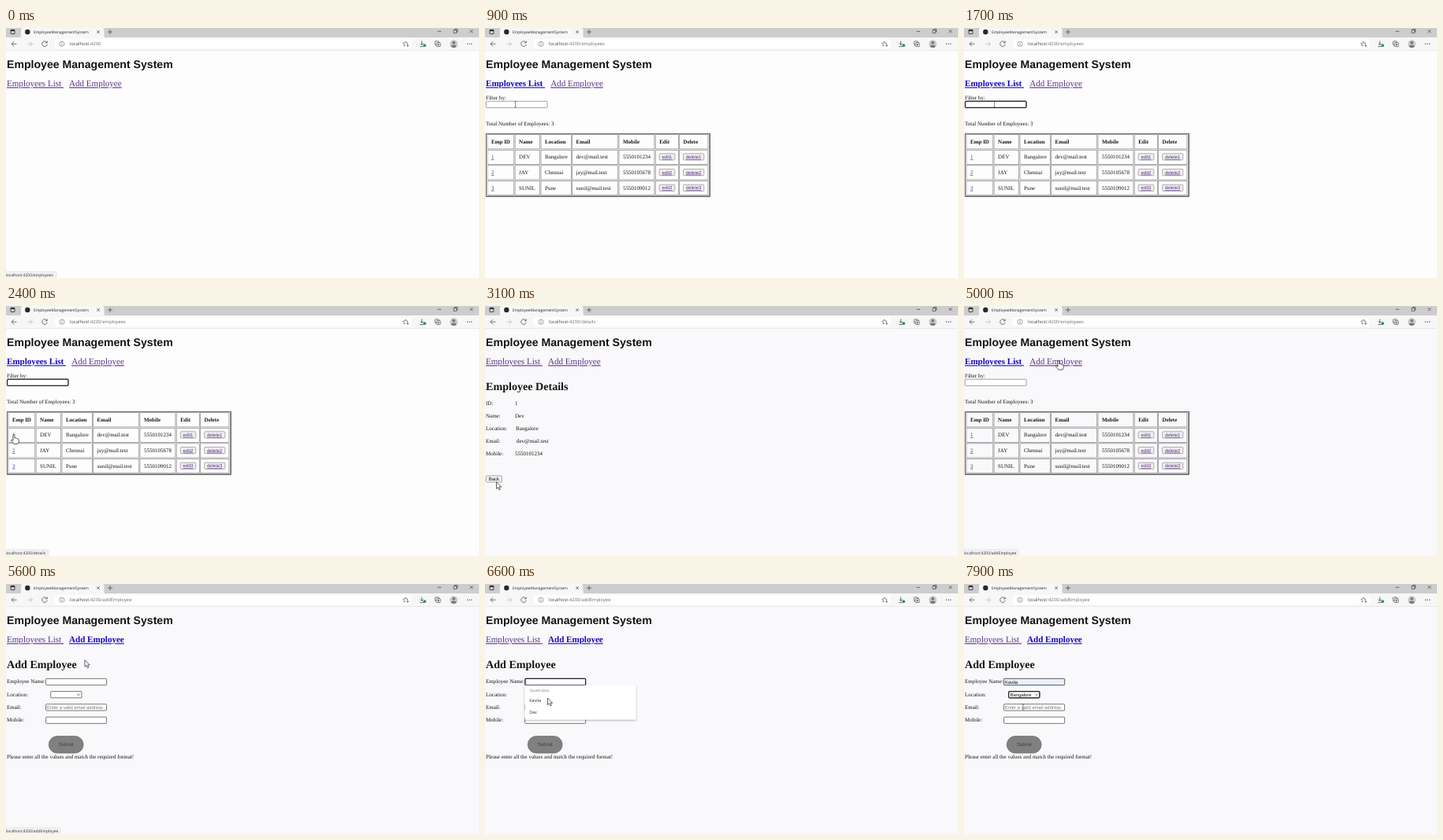
These frames come from a looping animation (600 px wide and 318 px high, 8000 ms). An HTML page:

```html
<!DOCTYPE html>
<html lang="en">
<head>
<meta charset="utf-8">
<title>Employee Management System</title>
<style>
html, body { margin: 0; width: 100%; height: 100%; overflow: hidden; background: #fdfdfd; }
svg { display: block; width: 100vw; height: 100vh; }
text { white-space: pre; text-rendering: geometricPrecision; }
.serif { font-family: "Liberation Serif", "Times New Roman", serif; }
.sans { font-family: "Liberation Sans", Arial, sans-serif; }
.ui { font-family: "Open Sans", "Noto Sans", sans-serif; }
.b { font-weight: 700; }
.u { text-decoration: underline; }
.line { fill: none; stroke: #444; stroke-width: .75; }
</style>
</head>
<body>
<svg id="stage" viewBox="0 0 600 318" preserveAspectRatio="none"></svg>
<script>
const LOOP = 8000, STEP = 100;
const PURPLE = '#5a2f8a', BLUE = '#1408c4', INK = '#141414';

const text = (x, y, s, size = 7, cls = 'serif', fill = INK) =>
  `<text x="${x}" y="${y}" font-size="${size}" class="${cls}" fill="${fill}">${s}</text>`;
const rect = (x, y, w, h, fill, stroke = 'none', sw = 0.7, rx = 0) =>
  `<rect x="${x}" y="${y}" width="${w}" height="${h}" rx="${rx}" fill="${fill}" stroke="${stroke}" stroke-width="${sw}"/>`;
const line = (d, extra = '') => `<path class="line" d="${d}" ${extra}/>`;
const group = (id, body) => `<g id="${id}">${body}</g>`;
const button = (x, y, w, label, cls = 'sans', fill = INK) =>
  rect(x, y, w, 8.2, '#efefef', '#8f8f8f', 0.7, 1) + text(x + 3.4, y + 6.2, label, 5.9, cls, fill);
const field = (x, y, w, fill = '#fff', stroke = '#555') => rect(x, y, w, 8.2, fill, stroke, 0.8, 0.8);
const ring = (x, y, w) => rect(x, y, w, 8.2, 'none', '#22222c', 1.2, 1.2);

// Browser frame
function chrome() {
  return rect(0, 0, 600, 12.5, '#cdcdcd') +
    rect(0, 12, 600, 16.3, '#f7f7f7') +
    rect(0, 28, 600, 0.7, '#e2e2e2') +
    '<path d="M17 12.5Q19 12 19 10V2.500Q19 0 21.500 0H122Q124.500 0 124.500 2.500V10Q124.500 12 126.500 12.500Z" fill="#f7f7f7"/>' +
    rect(6, 2.3, 5, 5.2, 'none', '#222', 0.8, 0.8) + rect(6, 2.2, 5, 1.7, '#222') +
    '<circle cx="27.300" cy="5" r="3.200" fill="#26282c"/>' +
    text(35, 6.9, 'EmployeeManagementSystem', 4.95, 'ui', '#222') +
    line('M115.300 3.200l3.600 3.600m0-3.600l-3.600 3.600') +
    line('M129 5h6M132 2v6') +
    line('M547.500 4.300h4.500M588.400 2.200l4 4m0-4l-4 4') +
    rect(568, 2.7, 3.6, 3.6, 'none', '#444', 0.7) + line('M569.200 2.700V1.600h3.500v3.500h-1.100') +
    line('M13.500 20.200H7m3-3l-3 3 3 3') +
    line('M27 20.200h6.500m-3-3l3 3-3 3', 'opacity=".35"') +
    line('M51.800 18.300A3.300 3.300 0 1 0 52.300 20.800M52.300 16.600v2.200h-2.300') +
    rect(62, 14.2, 452, 11.8, '#fff', 'none', 0, 2.5) +
    '<circle cx="71" cy="20.200" r="3.100" class="line" style="stroke:#666;stroke-width:.6"/>' +
    line('M71 19.600v2.300M71 18.100v.7', 'style="stroke:#666"') +
    line('M506.700 17l1 2 2.200.3-1.600 1.500M506.700 17l-1 2-2.200.3 1.700 1.500-.4 2.200 1.700-.9M508 22.300h3.200M509.600 20.700v3.200', 'stroke-linejoin="round" opacity=".8"') +
    line('M527.500 16.500v5m-2-2l2 2 2-2M525 23.600h4.500') +
    '<circle cx="531" cy="22.200" r="1.900" fill="#2f8f4e"/>' +
    rect(544.2, 16.8, 5, 5, 'none', '#444', 0.7, 1) + rect(546, 18.6, 5, 5, '#f7f7f7', '#444', 0.7, 1) +
    line('M547.200 21.100h2.600m-1.300-1.300v2.600') +
    '<circle cx="568" cy="20.200" r="5" fill="#cbc9ca"/><circle cx="568" cy="18.700" r="1.900" fill="#77797d"/>' +
    '<path d="M564.300 23.400a3.800 2.600 0 0 1 7.400 0Q568 27 564.300 23.400Z" fill="#77797d"/>' +
    [585.4, 588, 590.6].map(x => `<circle cx="${x}" cy="20.200" r=".65" fill="#333"/>`).join('');
}

function nav(active) {
  const link = (x, s, on) => text(x, 74.3, s, 11.07, on ? 'serif b u' : 'serif u', on ? BLUE : PURPLE);
  return link(1, 'Employees List\u00a0', active === 'list') +
    link(active === 'list' ? 83.2 : 80, 'Add Employee', active === 'add');
}

const staff = [
  ['DEV', 'Bangalore', 'dev@mail.test', '5550101234'],
  ['JAY', 'Chennai', 'jay@mail.test', '5550105678'],
  ['SUNIL', 'Pune', 'sunil@mail.test', '5550109012']
];

function listPage() {
  const xs = [3, 38.1, 71, 110.6, 170, 216.2, 246.6, 284.2];
  const heads = ['Emp ID', 'Name', 'Location', 'Email', 'Mobile', 'Edit', 'Delete'];
  let out = nav('list') + text(1, 91, 'Filter by:') + field(1.3, 93.2, 77.8, '#fff', '#8c8c8c') +
    text(1, 124, 'Total Number of Employees: 3') +
    rect(1.5, 134.4, 283.6, 79.8, 'none', '#555', 0.9) +
    line('M1.500 214.200H285.100V134.400', 'style="stroke:#333"');
  for (let r = 0; r < 4; r++) {
    const top = 135.7 + r * 19.55, base = 146.5 + r * 19.75;
    for (let c = 0; c < 7; c++) {
      const x = xs[c] + 5;
      out += rect(xs[c], top, xs[c + 1] - xs[c] - 1.3, 18.2, 'none', '#868686', 0.7);
      if (!r) out += text(x, base, heads[c], 7, 'serif b');
      else if (!c) out += text(x, base, r, 7, 'serif u', PURPLE);
      else if (c < 5) out += text(x, base, staff[r - 1][c - 1]);
      else out += button(x, base - 6.5, c === 5 ? 19.6 : 26.2, (c === 5 ? 'edit' : 'delete') + r, 'sans u', PURPLE);
    }
  }
  return out;
}

function detailsPage() {
  const rows = [['ID:', '1', 38], ['Name:', 'Dev', 38], ['Location:', 'Bangalore', 39],
    ['Email:', staff[0][2], 40], ['Mobile:', staff[0][3], 38]];
  return nav() + text(1, 107, 'Employee Details', 14.1, 'serif b') +
    rows.map(([k, v, x], i) => text(1, 126.3 + i * 15.9, k) + text(x, 126.3 + i * 15.9, v)).join('') +
    button(1.4, 215.9, 20, 'Back');
}

function addPage() {
  const labels = ['Employee Name:', 'Location:', 'Email:', 'Mobile:'];
  return nav('add') + text(1, 107, 'Add Employee', 14.1, 'serif b') +
    labels.map((s, i) => text(1, 126.4 + i * 16.35, s)).join('') +
    field(50.6, 120.4, 77) + field(50.6, 152.8, 77) + field(50.6, 169.2, 77) +
    field(56.7, 136.6, 39.2) + line('M90 139.800l1.900 1.900 1.900-1.900') +
    text(52, 158.9, 'Enter a valid email address', 5.9, 'sans', '#757575') +
    rect(54.3, 193.5, 43.8, 21.6, '#808080', '#727272', 0.8, 10.8) +
    text(67, 206.3, 'Submit', 6, 'sans', '#3c3c3c') +
    text(1, 221.6, 'Please enter all the values and match the required format!') +
    group('filled', field(50.6, 120.4, 77, '#e8f0fe') + text(52, 126.5, 'Kavita', 5.9, 'sans')) +
    group('nameRing', ring(51, 120.4, 76.6)) +
    group('place', text(58.7, 142.8, 'Bangalore', 5.9, 'sans')) +
    group('placeRing', ring(56.7, 136.6, 39.2)) +
    group('menu', rect(50.5, 128.8, 141, 43.7, '#fff', 'none', 0, 1) +
      text(57, 136.8, 'Saved data', 4.7, 'ui', '#777') +
      text(56.3, 150.2, 'Kavita', 5.3, 'ui', '#222') + text(56.3, 165.2, 'Dev', 5.3, 'ui', '#222'));
}

const shapes = {
  arrow: '<path d="M0 0V8.700L2 6.900 3.400 10.100 4.900 9.400 3.500 6.300H6.200Z" fill="#fff" stroke="#222" stroke-width=".7"/>',
  hand: '<path transform="scale(1.12)" d="M-.9 .8Q0-.6 .9 .8V4.500Q2.100 3.700 2.600 4.800 3.700 4.200 4.100 5.300 5.500 5 5.500 6.600V8.700Q5.300 10 4.500 11H-.2Q-1.400 9-3.100 7.300-3.300 5.900-1.800 6.500L-.9 7.300Z" fill="#fff" stroke="#222" stroke-width=".65"/>',
  beam: '<path d="M-1.300-3.700Q0-3.700 0-2.900 0-3.700 1.300-3.700M0-3V3M-1.300 3.700Q0 3.700 0 2.900 0 3.700 1.300 3.700" fill="none" stroke="#444" stroke-width=".6"/>'
};

const stage = document.getElementById('stage');
stage.innerHTML =
  '<defs><filter id="soft" x="-10%" y="-20%" width="120%" height="150%">' +
  '<feDropShadow dx="0" dy="1" stdDeviation="1.2" flood-color="#000" flood-opacity=".35"/></filter></defs>' +
  '<rect id="paper" width="600" height="318"/>' + chrome() +
  text(81, 22.3, 'localhost<tspan id="path" fill="#6c6c6c"></tspan>', 5.84, 'ui', '#444') +
  text(1, 51.2, 'Employee Management System', 14.1, 'sans b') +
  group('home', nav()) + group('list', listPage() + group('filterRing', ring(1.6, 93.2, 77.4))) +
  group('details', detailsPage()) + group('add', addPage()) +
  group('status', rect(-2, 309.8, 66, 10, '#f1f1f1', '#dedede', 0.6, 1.5) +
    text(-0.4, 316.2, '', 4.97, 'ui', '#333')) +
  group('cursor', Object.keys(shapes).map(k => group(k, shapes[k])).join(''));

const el = id => document.getElementById(id);
el('menu').setAttribute('filter', 'url(#soft)');

const pages = [[0, 'home'], [300, 'list'], [2500, 'details'], [3300, 'list'], [5400, 'add']];
const paths = { home: '', list: '/employees', details: '/details', add: '/addEmployee' };
const hints = [[0, '/employees'], [600, ''], [2200, '/details'], [2600, ''], [4800, '/addEmployee'], [5900, '']];
const hintWidths = { '/employees': 66, '/details': 56, '/addEmployee': 71 };
const spans = {
  filterRing: [1400, 2500], nameRing: [6000, 6900], menu: [6000, 6900],
  filled: [6900, LOOP], placeRing: [7500, LOOP], place: [7800, LOOP], cursor: [300, LOOP]
};
// time, x, y
const track = [
  [300, 34, 72], [700, 38.5, 97], [1900, 38.5, 97], [2300, 10, 163], [2600, 10, 163],
  [3000, 14.5, 223.8], [3500, 14.5, 223.8], [3900, 32, 260], [4300, 60, 200],
  [4900, 120, 68.8], [5400, 120, 68.8], [5800, 80, 124.5], [6200, 80, 124.5],
  [6600, 79.5, 145], [7000, 79.5, 147], [7400, 76, 141], [7700, 76, 141], [7900, 75, 156.4]
];
const looks = [[0, 'hand'], [500, 'arrow'], [700, 'beam'], [2000, 'arrow'], [2200, 'hand'],
  [2600, 'arrow'], [4800, 'hand'], [5500, 'arrow'], [5800, 'beam'], [6300, 'arrow'], [7900, 'beam']];

const at = (table, t) => table.filter(row => row[0] <= t).pop()[1];
const show = (id, on) => { el(id).style.display = on ? '' : 'none'; };

function place(t) {
  const i = track.findIndex(p => p[0] > t);
  if (i === 0) return track[0].slice(1);
  if (i < 0) return track[track.length - 1].slice(1);
  const [t0, x0, y0] = track[i - 1], [t1, x1, y1] = track[i];
  const u = (t - t0) / (t1 - t0), k = u * u * (3 - 2 * u);
  return [x0 + (x1 - x0) * k, y0 + (y1 - y0) * k];
}

function draw(t) {
  const page = at(pages, t), hint = at(hints, t), look = at(looks, t);
  for (const id in paths) show(id, id === page);
  for (const id in spans) show(id, t >= spans[id][0] && t < spans[id][1]);
  for (const id in shapes) show(id, id === look);
  el('path').textContent = ':4200' + paths[page];
  el('paper').setAttribute('fill', t < 2500 ? '#fdfdfd' : '#f9f8fa');
  show('status', hint);
  el('status').querySelector('text').textContent = 'localhost:4200' + hint;
  el('status').querySelector('rect').setAttribute('width', hintWidths[hint] || 0);
  el('cursor').setAttribute('transform', `translate(${place(t)})`);
}

const start = performance.now();
function tick() {
  const t = (performance.now() - start) % LOOP;
  draw(Math.floor(t / STEP) * STEP);
  requestAnimationFrame(tick);
}
tick();
</script>
</body>
</html>
```
